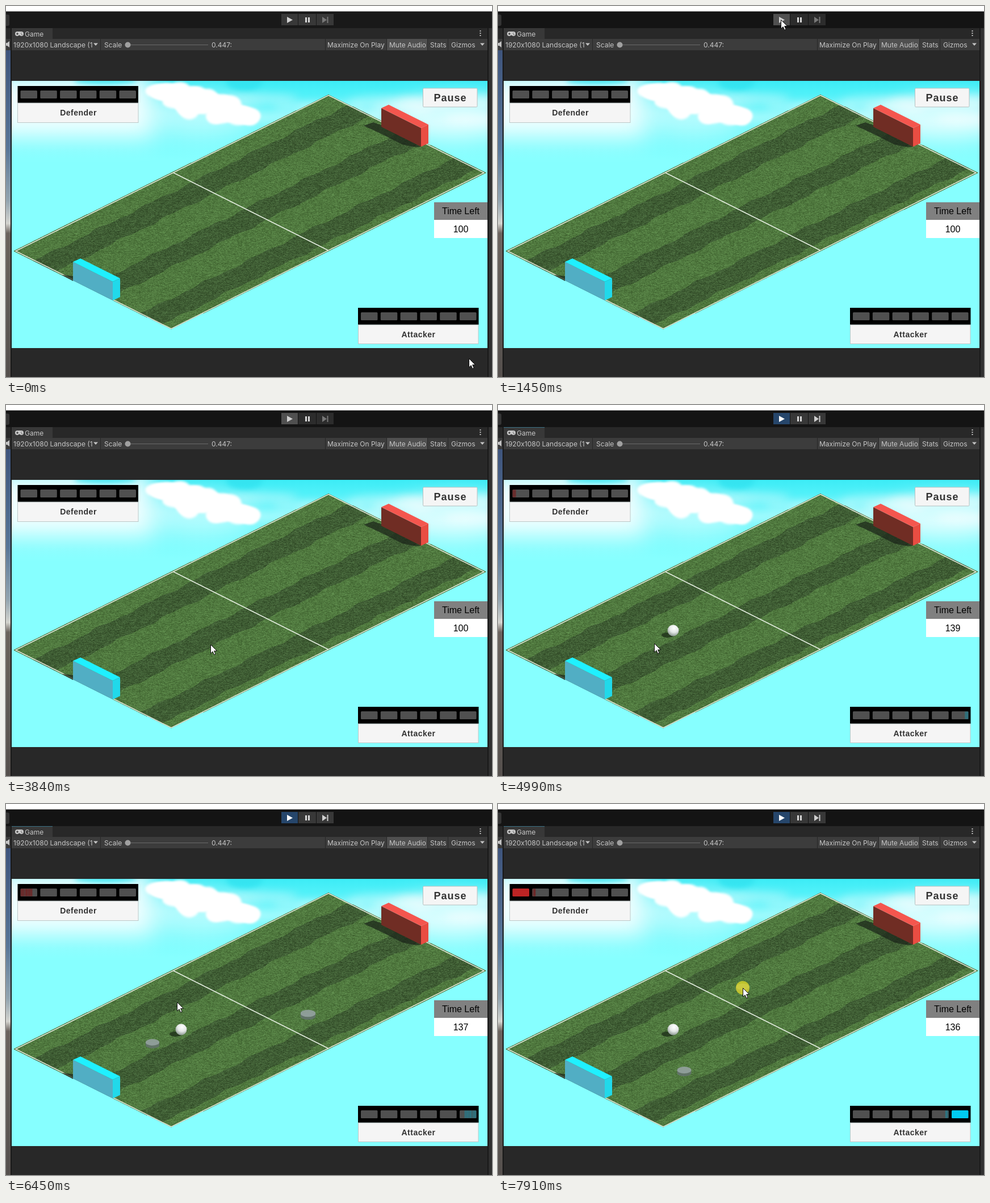
An HTML page with a canvas for the animation above (7990 ms loop, 856x654 px).

```html
<!DOCTYPE html>
<html lang="en">
<head>
<meta charset="utf-8">
<title>Game view</title>
<style>
html, body { margin: 0; width: 100%; height: 100%; overflow: hidden; background: #282828; }
canvas, svg { position: absolute; left: 0; top: 0; display: block; }
.ui { font: 12px Inter, sans-serif; fill: #c6c6c6; }
.game { font-family: "Liberation Sans", Arial, sans-serif; text-anchor: middle; fill: #323232; }
.bold { font-weight: bold; font-size: 14px; letter-spacing: .5px; }
.big { font-weight: bold; font-size: 18px; letter-spacing: 1px; }
.time { font-size: 16px; fill: #000; }
</style>
</head>
<body>
<canvas id="scene" width="856" height="654"></canvas>
<svg id="stage" width="856" height="654" viewBox="0 0 856 654">
  <defs>
    <linearGradient id="strip" x1="0" y1="0" x2="0" y2="1">
      <stop offset="0" stop-color="#3e547c"/><stop offset=".3" stop-color="#587698"/>
      <stop offset=".46" stop-color="#93a5b0"/><stop offset=".53" stop-color="#d4d4cf"/>
      <stop offset=".56" stop-color="#6b635e"/><stop offset="1" stop-color="#55504d"/>
    </linearGradient>
    <radialGradient id="shine" cx=".58" cy=".28" r=".78">
      <stop offset="0" stop-color="#fff"/><stop offset=".5" stop-color="#e4e8e6"/>
      <stop offset="1" stop-color="#7c8a82"/>
    </radialGradient>
  </defs>

  <rect width="856" height="10" fill="#fff"/>
  <rect id="bar" y="9.500" width="856" height="29.500"/>
  <rect x="-6" y="15" width="12" height="20" rx="3" fill="#343434"/>
  <rect id="play" x="485" y="14" width="29" height="20"/>
  <path id="others" d="M515 14h31v20h-31zM547 14h30v20h-30z"/>
  <path id="playIcon" d="M495 19l10 5.500-10 5.500z"/>
  <path d="M527 20h3v9h-3zM532 20h3v9h-3z" fill="#d6d6d6"/>
  <path id="stepIcon" d="M557 19l8 5.500-8 5.500zM565.500 19h2v11h-2z"/>

  <rect y="39" width="856" height="19" fill="#282828"/>
  <rect x="10" y="39" width="72" height="19" fill="#383838"/>
  <rect id="tabLine" x="10" y="39" width="72" height="1" fill="#3c7184"/>
  <path d="M20 45h7a3.800 3.800 0 0 1 0 8c-2 0-2-1.500-3.500-1.500S22 53 20 53a3.800 3.800 0 0 1 0-8z" fill="#c8c8c8"/>
  <path d="M18 49h4M20 47v4M26 48h1.500M27 50.500h1.500" stroke="#333" stroke-width="1.200"/>
  <rect y="58" width="856" height="20" fill="#3c3c3c"/>
  <path d="M0 65h2l4-3v11l-4-3H0z" fill="#c4c4c4"/>
  <rect x="671" y="58" width="71" height="20" fill="#505050"/>
  <path d="M166.500 58v20M562.500 58v20M670.500 58v20M742.500 58v20M778.500 58v20" stroke="#272727"/>
  <path d="M214 68.500h142" stroke="#6a6a6a"/>
  <circle cx="214.500" cy="68.500" r="5" fill="#a0a0a0"/>
  <path d="M154 65.500h8l-4 4.500zM835 65.500h8l-4 4.500z" fill="#c4c4c4"/>
  <path d="M834.500 43h2v2h-2zM834.500 47h2v2h-2zM834.500 51h2v2h-2z" fill="#c4c4c4"/>
  <g class="ui">
    <text x="33" y="53.500">Game</text>
    <text x="13" y="72.500">1920x1080 Landscape (1</text>
    <text x="173" y="72.500">Scale</text>
    <text x="362" y="72.500">0.447:</text>
    <text x="566" y="72.500">Maximize On Play</text>
    <text x="675" y="72.500">Mute Audio</text>
    <text x="747" y="72.500">Stats</text>
    <text x="784" y="72.500">Gizmos</text>
  </g>
  <rect y="78" width="8" height="576" fill="url(#strip)"/>
  <path d="M8 39h2v615h-2zM848 39h2v615h-2z" fill="#191919"/>
  <rect x="850" y="39" width="6" height="615" fill="#303030"/>

  <g id="ball">
    <ellipse cx="299" cy="405.500" rx="11" ry="4.500" fill="#1c2c18" fill-opacity=".75"/>
    <circle cx="308.500" cy="397.500" r="10" fill="url(#shine)"/>
  </g>
  <g id="discs"></g>

  <g id="meters"></g>
  <rect x="20.500" y="171" width="212.500" height="34.500" fill="#f5f5f5" stroke="#bcc8c8"/>
  <rect x="620.500" y="562" width="211.500" height="33.500" fill="#f5f5f5" stroke="#bcc8c8"/>
  <rect x="734.500" y="145" width="95.500" height="33" rx="1.500" fill="#f5f5f5" stroke="#b4c0c0"/>
  <rect x="754" y="346" width="94" height="31" fill="#808080"/>
  <rect x="754" y="377" width="94" height="32" fill="#fff"/>
  <g class="game">
    <text class="bold" x="127.500" y="193">Defender</text>
    <text class="bold" x="726.500" y="583.500">Attacker</text>
    <text class="big" x="782.500" y="167.500">Pause</text>
    <text class="time" x="801" y="367">Time Left</text>
    <text class="time" id="clock" x="801" y="398.500"></text>
  </g>
  <circle id="click" r="12" fill="#dcd728" fill-opacity=".78"/>
  <path id="cursor" d="M.5.500v15.500l3.600-3.400 2.500 5.700 2.500-1.100-2.500-5.600h5z" fill="#fff" stroke="#111"/>
</svg>
<script>
const LOOP = 7990, STEP = 76.85, START = 4060, RUN = 4210;
const $ = id => document.getElementById(id);
const fill = (id, color) => $(id).setAttribute("fill", color);
const show = (id, on) => { $(id).style.display = on ? "" : "none"; };
const clamp = k => Math.min(1, Math.max(0, k));
const mix = (a, b, k) => a + (b - a) * k;

function random(seed) {
  return () => (seed = (seed * 1664525 + 1013904223) >>> 0) / 4294967296;
}

const ctx = $("scene").getContext("2d");

function shape(pts, color) {
  ctx.fillStyle = color;
  ctx.fill(new Path2D("M" + pts + "z"));
}

function puff(x, y, rx, ry, color) {
  ctx.fillStyle = color;
  ctx.beginPath();
  ctx.ellipse(x, y, rx, ry, 0, 0, 7);
  ctx.fill();
}

function drawSky() {
  const rnd = random(5);
  const sky = ctx.createLinearGradient(0, 132, 0, 270);
  sky.addColorStop(0, "#3cecf6");
  sky.addColorStop(.4, "#6cf7fc");
  sky.addColorStop(1, "#86ffff");
  ctx.fillStyle = sky;
  ctx.fillRect(10, 132, 838, 471);

  // Haze on the left, thin streaks on the right.
  ctx.filter = "blur(20px)";
  ctx.fillStyle = "rgba(255,255,255,.9)";
  ctx.fillRect(-30, 115, 290, 118);
  puff(340, 190, 100, 36, "rgba(255,255,255,.5)");
  puff(790, 200, 110, 34, "rgba(255,255,255,.8)");
  ctx.filter = "blur(8px)";
  for (let i = 0; i < 14; i++)
    puff(mix(450, 850, i / 13), 150 + 55 * rnd(), 35 + 40 * rnd(), 6 + 8 * rnd(), "rgba(255,255,255,.4)");
  ctx.filter = "blur(4px)";
  puff(175, 132, 55, 7, "#4feaf4");
  puff(420, 134, 32, 14, "#35e4f0");

  // One lumpy cloud along a slanted line.
  ctx.filter = "blur(2px)";
  for (let i = 0; i <= 40; i++) {
    const k = i / 40, spread = 20 * Math.sin(Math.PI * k);
    puff(mix(265, 430, k), mix(150, 196, k) + (rnd() - .5) * 2 * spread, 15 + 8 * rnd(), 11 + 6 * rnd(), "#fff");
  }
  ctx.filter = "none";
}

// The pitch: v runs from 0 to 1 across the short side, u along the long side.
const long = [553, -275], short = [276, 137];
const det = long[0] * short[1] - short[0] * long[1];

function drawGrass() {
  const rnd = random(11), img = ctx.getImageData(0, 0, 856, 654), d = img.data;
  for (let y = 154; y < 573; y++) {
    let blade = 0;
    for (let x = 12; x < 847; x++) {
      const dx = x - 14.5, dy = y - 431.5;
      const u = (dx * short[1] - dy * short[0]) / det;
      const v = (long[0] * dy - long[1] * dx) / det;
      if (Math.abs(u - .5) > .502 || Math.abs(v - .5) > .504) continue;
      blade = blade * .4 + (rnd() - .5) * 36;
      const wave = .006 * Math.sin(u * 38) + .004 * Math.sin(u * 90 + 2);
      const lit = (v + wave + .075) % .34 < .2 ? 1 : 0, i = (y * 856 + x) * 4;
      d[i] = mix(63, 80, lit) + blade * .75;
      d[i + 1] = mix(93, 121, lit) + blade;
      d[i + 2] = mix(52, 63, lit) + blade * .7;
    }
  }
  ctx.putImageData(img, 0, 0);
  ctx.strokeStyle = "#e6eee2";
  ctx.lineWidth = 1.4;
  ctx.stroke(new Path2D("M568 157.5L842 294 291 569 17 432zM295 294L568 431"));
}

function drawGoal(x, y, front, top, side) {
  ctx.save();
  ctx.translate(x, y);
  shape("0 0 70 35 70 68 0 33", front);
  shape("0 0 13-6 83 29 70 35", top);
  shape("70 35 83 29 83 62 70 68", side);
  ctx.restore();
}

function drawScene() {
  const shadow = "rgba(28,38,26,.74)";
  ctx.fillStyle = "#282828";
  ctx.fillRect(0, 0, 856, 654);
  ctx.beginPath();
  ctx.rect(10, 132, 838, 471);
  ctx.clip();
  drawSky();
  drawGrass();
  shape("630 211 647 205 661 210 731 248 722 249 698 244 660 225", shadow);
  shape("98 474 118 476 118 485", shadow);
  drawGoal(661, 180, "#702d24", "#f4564e", "#e94d42");
  drawGoal(118, 451, "#51aec4", "#20f0ff", "#21d9ea");
}

// Pointer moves: arrival, duration, x, y, and for a click how long its disc stays.
const moves = [
  [0, 1, 815, 621], [600, 600, 490, 39], [970, 180, 498, 24], [1297, 1, 498, 24, 0],
  [2920, 300, 396, 158], [3460, 440, 419, 371], [3840, 300, 360, 422], [4990, 850, 275, 420],
  [5760, 600, 532, 371, 1650], [6215, 350, 258, 422, 600], [6450, 180, 301, 349],
  [7140, 500, 279, 443, 330], [7520, 250, 328, 471, 600], [7900, 300, 431, 324, 1650]
];
const clicks = moves.filter(m => m.length > 4);

function pointer(t) {
  let x = 815, y = 621;
  for (const [end, span, toX, toY] of moves) {
    const k = clamp((t - end + span) / span), ease = k * k * (3 - 2 * k);
    x = mix(x, toX, ease);
    y = mix(y, toY, ease);
  }
  return [Math.round(x), Math.round(y)];
}

function disc([at, , x, y, life], t) {
  if (t < at || t >= at + life) return "";
  const r = 11.5 + (t - at) / 400, h = r * .48;
  return `<path d="M${x - r} ${y - 2}v5a${r} ${h} 0 0 0 ${2 * r} 0v-5z" fill="#63726c" fill-opacity=".9"/>` +
    `<ellipse cx="${x}" cy="${y - 2}" rx="${r}" ry="${h}" fill="#93a19d" fill-opacity=".92"/>`;
}

const rect = (x, y, w, h, color, more = "") =>
  `<rect x="${x}" y="${y}" width="${w}" height="${h}" fill="${color}" ${more}/>`;

// Six cells that fill one after another, from the right when flipped.
function meter(x, y, level, flip, tint, full) {
  let s = rect(x, y, 212.5, 30, "#000");
  for (let i = 0; i < 6; i++) {
    const cx = x + 5 + 34.8 * (flip ? 5 - i : i), cy = y + 8, part = clamp(level - i);
    const rnd = random(7 + i);
    s += rect(cx, cy, 29.5, 14, part === 1 ? full : "#505050", 'rx="1.500"');
    for (let p = 0; part < 1 && p < part * 29.5; p++)
      s += rect(flip ? cx + 28.5 - p : cx + p, cy + .5, 1, 13, tint,
        `fill-opacity="${(.35 + .65 * rnd()).toFixed(2)}"`);
  }
  return s;
}

function render(time) {
  const t = time < 66 ? 0 : 70 + Math.floor((time - 66) / STEP) * STEP;
  const playing = t >= START, running = t >= RUN, pressed = t >= 1295, tinted = t >= 1370;
  fill("bar", tinted ? "#141414" : "#191919");
  fill("play", running ? "#26466b" : pressed ? "#505050" : "#383838");
  fill("others", tinted && !running ? "#2c2c2c" : "#383838");
  fill("playIcon", running ? "#fff" : "#d0d0d0");
  fill("stepIcon", running ? "#cfcfcf" : "#777");
  show("tabLine", playing);
  show("ball", playing);

  $("clock").textContent = playing ? 140 - Math.floor((t - 3100) / 1000) : 100;
  const level = Math.max(0, (t - 4380) / 3000);
  $("meters").innerHTML = meter(20.5, 141, level, false, "#7a1818", "#bd2424") +
    meter(620, 532, level, true, "#1f8496", "#00ccf2");

  $("discs").innerHTML = clicks.map(c => disc(c, t)).join("");
  const hit = clicks.find(([at]) => t >= at && t < at + 150);
  show("click", hit);
  if (hit) $("click").setAttribute("transform", `translate(${hit[2]} ${hit[3]})`);
  $("cursor").setAttribute("transform", `translate(${pointer(t)})`);
}

drawScene();
const begin = performance.now();
function tick() {
  render((performance.now() - begin) % LOOP);
  requestAnimationFrame(tick);
}
tick();
</script>
</body>
</html>
```
